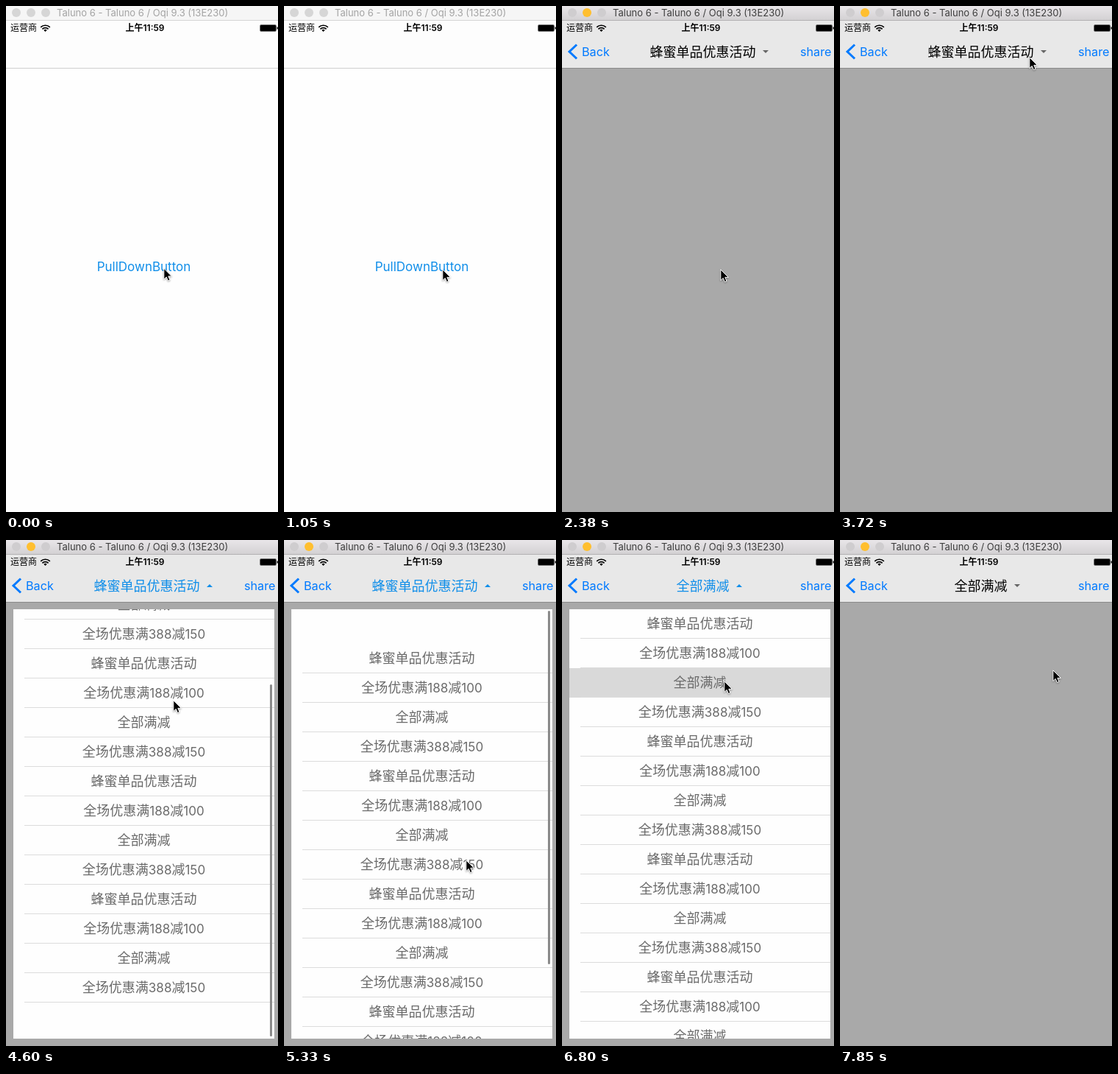
An HTML page for the animation above (8000 ms loop, 370 by 687 pixels).

```html
<!DOCTYPE html>
<html lang="zh-CN">
<head>
<meta charset="utf-8">
<title>Pull-down menu</title>
<style>
  html, body { margin: 0; width: 100%; height: 100%; overflow: hidden; }
  body { background: #fefefe; }
  #stage {
    position: relative; width: 370px; height: 687px; overflow: hidden; background: #fefefe;
    font-family: Inter, "Noto Sans CJK SC", "Noto Sans CJK", sans-serif;
    white-space: nowrap; user-select: none;
  }
  #stage div, #stage svg { position: absolute; }
  i { font-style: normal; }

  #button { left: 0; top: 334px; width: 375px; text-align: center; font-size: 17px; line-height: 40px; color: #108ee9; }
  #dim { inset: 0; background: #000; }
  #page { left: 0; top: 20px; width: 370px; height: 667px; background: #a9a9a9; }
  #page::before {
    content: ""; position: absolute; left: -9px; width: 9px; height: 100%;
    background: linear-gradient(90deg, transparent, rgba(0, 0, 0, .2));
  }

  #nav {
    left: 0; top: 20px; width: 370px; height: 64px;
    background: rgba(253, 253, 253, .76) padding-box; border-bottom: 1px solid rgba(0, 0, 0, .18);
  }
  #nav div { line-height: 40px; top: 22px; }
  #back, #share { color: #007aff; font-size: 16.2px; }
  #back { left: 27px; }
  #back svg { left: -20px; top: 8px; }
  #share { left: 324px; }
  #nav #title { left: 0; top: 23px; width: 400px; text-align: center; font-size: 18px; }
  #title::after {
    content: ""; display: inline-block; margin-left: 9px; vertical-align: 5px;
    border: solid transparent; border-width: 0 4.5px; border-top: 4.5px solid #666;
  }
  #title.open { color: #108ee9; }
  #title.open::after { border-top: 0; border-bottom: 4.5px solid #108ee9; }
  #status { left: 0; top: 20px; width: 370px; height: 20px; font-size: 12px; line-height: 20px; color: #000; }
  #carrier { left: 6px; }
  #clock { left: 0; width: 378px; text-align: center; font-weight: 600; }

  #panel { left: 10px; top: 94px; width: 355px; height: 583px; background: #fefefe; overflow: hidden; }
  #rows { left: 0; top: 0; width: 355px; }
  #rows div { width: 355px; height: 40px; text-align: center; font-size: 18px; line-height: 40px; color: #6a6a6a; }
  #rows div::after { content: ""; position: absolute; left: 15px; right: 0; bottom: 0; height: 1px; background: #dcdcdc; }
  #rows i { font-size: 17px; }
  #rows .picked { background: #d9d9d9; }
  #bar { left: 349px; width: 3px; border-radius: 2px; background: #8a8a8a; }

  #window {
    left: 0; top: 0; width: 370px; height: 19px; border-bottom: 1px solid #b3b1b3;
    background: linear-gradient(#e9e6e9, #d3d1d3);
    font-size: 13px; line-height: 19px; color: #3d3d3d;
  }
  #window span { position: absolute; left: 69px; }
  #window div { top: 3px; width: 12px; height: 12px; border-radius: 50%; background: #cfcdcf; }
  #window div:nth-of-type(1) { left: 8px; }
  #window div:nth-of-type(2) { left: 28px; background: #ffbf2f; }
  #window div:nth-of-type(3) { left: 48px; }
  #window.idle { background: #f6f6f6; border-color: #d4d4d4; color: #a3a3a3; }
  #window.idle div { background: #d6d6d6; }
  #cursor { left: 0; top: 0; overflow: visible; filter: drop-shadow(0 1px 1px rgba(0, 0, 0, .35)); }
</style>
</head>
<body>
<div id="stage">
  <div id="button">PullDownButton</div>
  <div id="dim"></div>
  <div id="page"></div>
  <div id="panel"><div id="rows"></div><div id="bar"></div></div>
  <div id="nav">
    <div id="back">
      <svg width="16" height="24" fill="none" stroke="#007aff" stroke-width="3"><path d="M13 2.5 3 12 13 21.5"/></svg>Back
    </div>
    <div id="title"></div>
    <div id="share">share</div>
  </div>
  <div id="status">
    <div id="carrier">运营商</div>
    <svg style="left:46px;top:4px" width="15" height="12" fill="none" stroke="#000" stroke-width="1.7">
      <path d="M1.2 4.9A8.8 8.8 0 0 1 13.8 4.9M3.4 7.3A5.7 5.7 0 0 1 11.6 7.3"/>
      <path d="M7.5 11 5.3 8.8A3.2 3.2 0 0 1 9.7 8.8Z" fill="#000" stroke="none"/>
    </svg>
    <div id="clock">上午11:59</div>
    <svg style="left:344px;top:4px" width="26" height="12">
      <rect x="1.5" y="1.5" width="22" height="9" rx="1.5" fill="none" stroke="#000" stroke-width=".5"/>
      <rect x="2" y="2" width="21" height="8" rx=".8"/>
      <path d="M24.5 4Q26 4.5 26 6T24.5 8Z"/>
    </svg>
  </div>
  <div id="window"><div></div><div></div><div></div><span>Taluno 6 - Taluno 6 / Oqi 9.3 (13E230)</span></div>
  <svg id="cursor" width="13" height="20">
    <path d="M.8 .8V15.6L4.2 12.4 6.4 17.6 9 16.5 6.8 11.4H11.4Z" stroke="#fff" stroke-width="1"/>
  </svg>
</div>
<script>
  const $ = id => document.getElementById(id);
  const LOOP = 8000, FRAME = 147.8, VIEW = 583, CONTENT = 640, TRACK = 578;
  const OFFERS = ['蜂蜜单品优惠活动', '全场优惠满188减100', '全部满减', '全场优惠满388减150'];

  // Where the pointer rests after each gesture
  const STOPS = [
    { from: 2600, to: 3690, x: 257, y: 69 },
    { from: 3900, to: 4300, x: 236, y: 410 },
    { from: 4300, to: 4580, x: 227, y: 217 },
    { from: 4890, to: 5320, x: 247, y: 434 },
    { from: 6150, to: 6500, x: 220, y: 191 },
    { from: 7500, to: 7830, x: 289, y: 176 }
  ];

  const progress = (t, from, to) => Math.min(1, Math.max(0, (t - from) / (to - from)));
  const smooth = k => k * k * (3 - 2 * k);
  const easeOut = k => 1 - (1 - k) ** 3;

  function pointer(t) {
    const dip = Math.sin(Math.PI * progress(t, 200, 1000));
    let x = 214 + progress(t, 200, 1000) + 22 * dip;
    let y = 355.5 + 1.5 * progress(t, 200, 1000) + 51 * dip;
    for (const stop of STOPS) {
      const k = smooth(progress(t, stop.from, stop.to));
      x += (stop.x - x) * k;
      y += (stop.y - y) * k;
    }
    return `translate(${x}px, ${y}px)`;
  }

  // Two drags past the ends of the list, each followed by a bounce back
  const scrollAt = t =>
    -107 * smooth(progress(t, 4300, 4580)) + 50 * easeOut(progress(t, 4580, 4880)) +
    104 * smooth(progress(t, 4890, 5320)) - 47 * easeOut(progress(t, 5320, 5800));

  const rows = Array.from({ length: 16 }, (_, i) => {
    const row = document.createElement('div');
    row.style.top = i * 40 + 'px';
    row.innerHTML = OFFERS[i % 4].replace(/\d+/g, '<i>$&</i>');
    $('rows').append(row);
    return row;
  });

  function drawBar(t, scroll) {
    const limit = CONTENT - VIEW;
    const over = Math.max(0, scroll, -scroll - limit);
    const length = TRACK * VIEW / CONTENT - over;
    const bar = $('bar').style;
    bar.height = length + 'px';
    bar.top = 2 + progress(-scroll, 0, limit) * (TRACK - length) + 'px';
    bar.opacity = progress(t, 4160, 4300) - progress(t, 5900, 6050);
  }

  function draw(t) {
    const push = easeOut(progress(t, 1708, 2308));
    const scroll = Math.round(scrollAt(t));
    const open = t > 3840 && t < 6940;

    $('cursor').style.transform = pointer(t);
    $('window').className = t < 1620 ? 'idle' : '';

    $('button').style.transform = `translateX(${-Math.round(116 * push)}px)`;
    $('dim').style.opacity = .08 * push;
    $('page').style.transform = `translateX(${Math.round(370 * (1 - push))}px)`;
    $('page').style.visibility = push ? 'visible' : 'hidden';
    $('share').style.opacity = push;
    $('back').style.opacity = $('title').style.opacity = progress(push, .3, 1);

    $('title').textContent = OFFERS[t < 6790 ? 0 : 2];
    $('title').className = open ? 'open' : '';
    $('panel').style.height = (open ? VIEW * progress(t, 3740, 3990) : 0) + 'px';
    $('rows').style.transform = `translateY(${scroll}px)`;
    rows[2].className = t > 6640 ? 'picked' : '';
    drawBar(t, scroll);
  }

  function tick() {
    const now = performance.now() % LOOP;
    draw(Math.floor(now / FRAME) * FRAME);
    requestAnimationFrame(tick);
  }
  tick();
</script>
</body>
</html>
```
